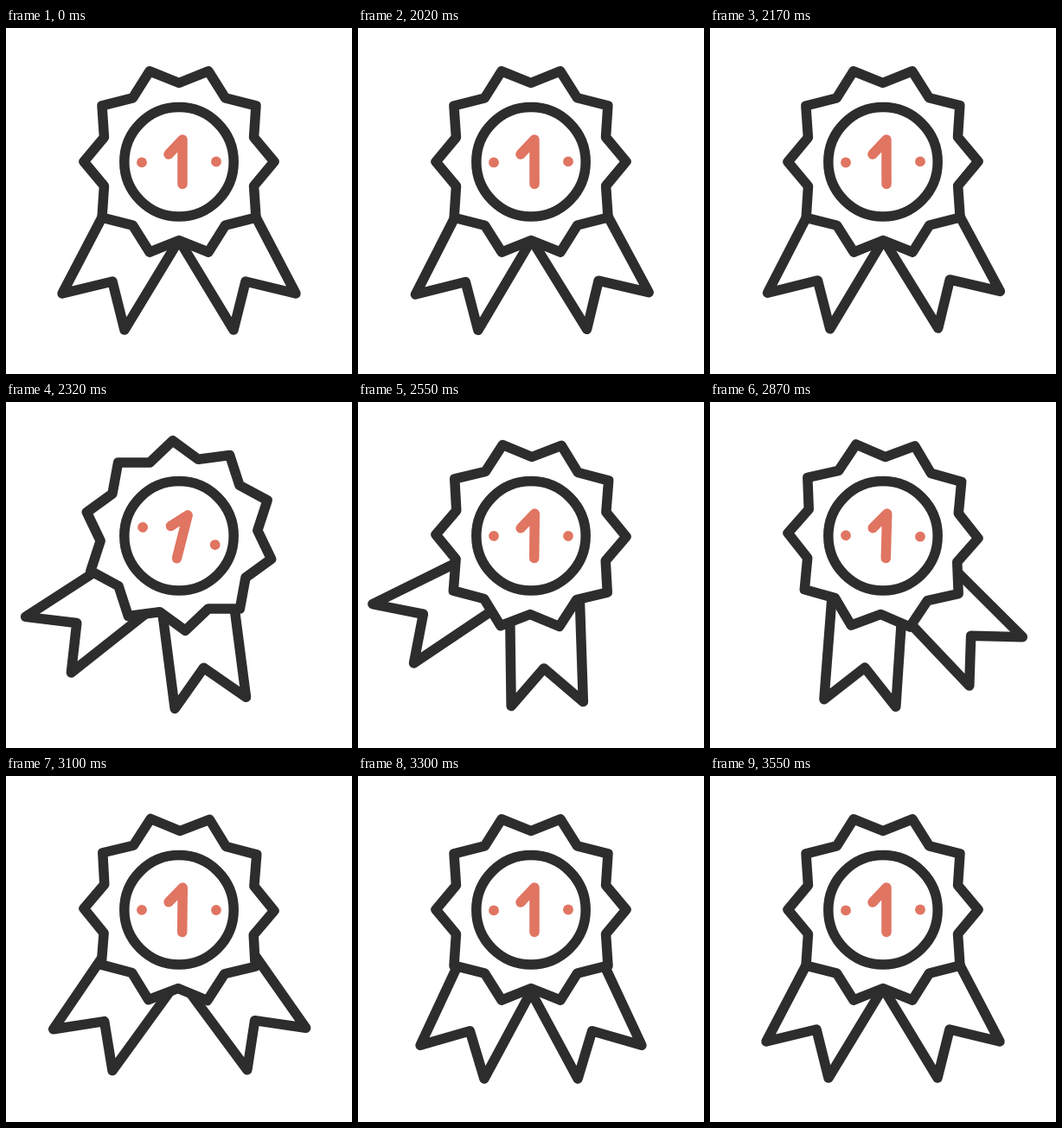
These frames come from a looping animation (400x400 px, 3570 ms). An HTML page with a canvas:

```html
<!DOCTYPE html>
<html lang="en">
<head>
<meta charset="utf-8">
<title>First place rosette</title>
<style>
  html, body { margin: 0; width: 100%; height: 100%; overflow: hidden; background: #fff; }
  canvas { display: block; width: 400px; height: 400px; }
</style>
</head>
<body>
<canvas id="stage" width="400" height="400"></canvas>
<script>
const ctx = document.getElementById('stage').getContext('2d');
const LOOP = 3570, CX = 200, CY = 154.5;
const INK = '#2d2d2d', CORAL = '#e07562';

// Left ribbon at rest, relative to the rosette centre; the right one is mirrored.
const OUTER_BASE = [-89, 64.5], INNER_BASE = [0, 90.5];
const TAIL = [[-135, 152.5], [-77, 138.5], [-63, 194.5]];
const TAIL_MID = [-91.7, 161.8];

// Turning points of each swing: [ms, degrees clockwise]
const STAR_SWING = [[2010, 0], [2110, -3], [2340, 14.5], [2665, -4.6], [2900, 1.8], [3250, 0]];
const WINDUP = [[1990, 0], [2110, -3.2]];
const SETTLE = [[3150, 7.2], [3330, -3], [3500, 0]];
const ribbonSwing = (side, middle) =>
  [...WINDUP, ...middle, ...SETTLE.map(([t, deg]) => [t, deg * side])];
const LEFT_SWING = ribbonSwing(1, [[2410, 26.4], [2520, 25.7], [2890, -22]]);
const RIGHT_SWING = ribbonSwing(-1, [[2410, 24.5], [2560, 24], [2965, -17.5], [3075, -4.6]]);

// Moves from one turning point to the next like a pendulum.
function swingAt(points, t) {
  const i = points.findIndex(p => p[0] > t);
  if (i < 1) return 0;
  const [t0, a] = points[i - 1], [t1, b] = points[i];
  return a + (b - a) * (1 - Math.cos(Math.PI * (t - t0) / (t1 - t0))) / 2;
}

const rad = deg => deg * Math.PI / 180;

function turn([x, y], deg) {
  const c = Math.cos(rad(deg)), s = Math.sin(rad(deg));
  return [x * c - y * s, x * s + y * c];
}

// Point on the line from a through b, k times its length.
const along = (a, b, k) => a.map((v, i) => v + (b[i] - v) * k);

function trace(points, color = INK) {
  ctx.beginPath();
  for (const [x, y] of points) ctx.lineTo(x, y);
  ctx.strokeStyle = color;
}

function disc(x, y, r) {
  ctx.beginPath();
  ctx.arc(x, y, r, 0, 2 * Math.PI);
}

function ribbon(swing, t, side) {
  const out = side * swingAt(swing, t);
  const phase = Math.min(1, Math.max(0, (t - 2000) / 1450));
  const pull = 1 - 0.025 * Math.sin(Math.PI * phase);

  // The tail moves as one stiff piece, the bases follow less far.
  const [mx, my] = turn(TAIL_MID, out);
  const spin = out * (out > 0 ? 1 : 1.12);
  const tail = TAIL.map(([x, y]) => {
    const [dx, dy] = turn([x - TAIL_MID[0], y - TAIL_MID[1]], spin);
    return [mx * pull + dx, my * pull + dy];
  });
  const outer = turn(OUTER_BASE, out * (out > 0 ? 0.6 : 0.95));
  const inner = turn(INNER_BASE, out * (out > 0 ? 1 : 0.65));

  ctx.save();
  ctx.scale(side, 1);
  trace([along(tail[0], outer, 1.25), ...tail, along(tail[2], inner, 1.2)]);
  ctx.stroke();
  ctx.restore();
}

function rosette(angle) {
  ctx.save();
  ctx.rotate(rad(angle));
  trace(Array.from({ length: 20 }, (_, i) => turn([i % 2 ? 91 : 110, 0], i * 18)));
  ctx.closePath();
  ctx.fillStyle = '#fff';
  ctx.fill();
  ctx.stroke();

  trace([[-12, -8.5], [4, -25.5], [4, 26]], CORAL);
  ctx.stroke();
  ctx.fillStyle = CORAL;
  disc(-43, 0.9, 5.9);
  ctx.fill();
  disc(43, 0, 5.9);
  ctx.fill();
  ctx.restore();

  ctx.strokeStyle = INK;
  disc(0, 0.3, 63.2);
  ctx.stroke();
}

function draw() {
  const t = performance.now() % LOOP;
  ctx.setTransform(1, 0, 0, 1, 0, 0);
  ctx.fillStyle = '#fff';
  ctx.fillRect(0, 0, 400, 400);
  ctx.translate(CX, CY);
  ctx.lineWidth = 11.5;
  ctx.lineCap = ctx.lineJoin = 'round';
  ribbon(LEFT_SWING, t, 1);
  ribbon(RIGHT_SWING, t, -1);
  rosette(swingAt(STAR_SWING, t));
  requestAnimationFrame(draw);
}
draw();
</script>
</body>
</html>
```
